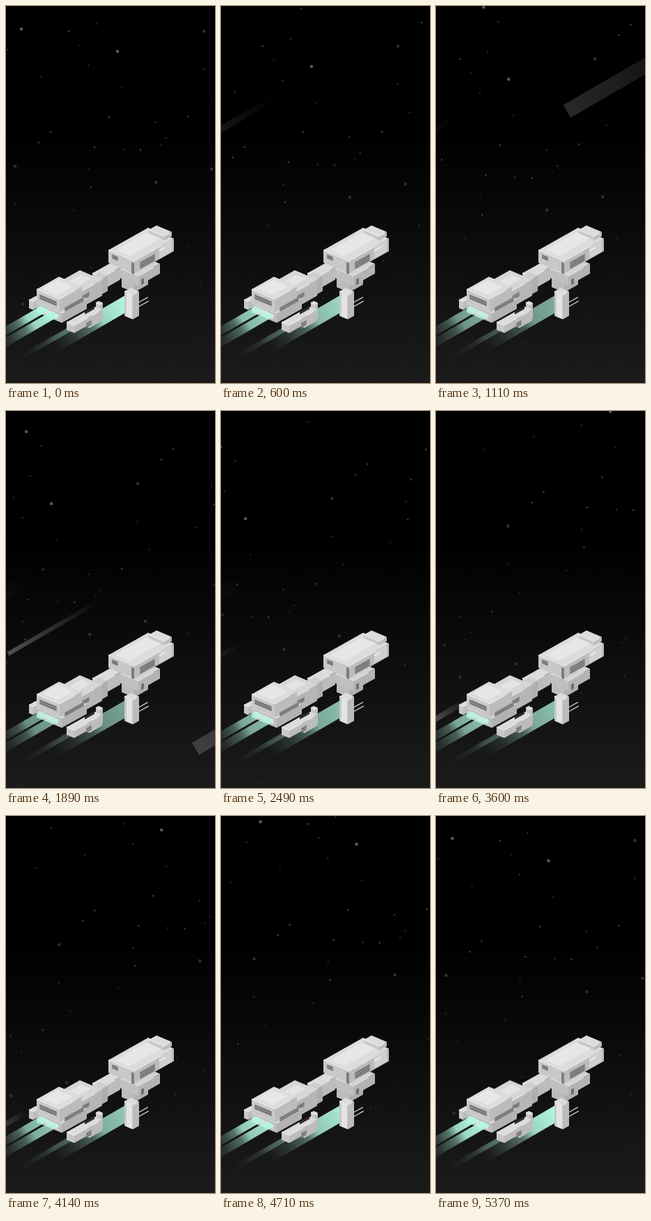
Animation, 300 px wide and 539 px high, one loop 5460 ms. Source, as an HTML page with a canvas:

```html
<!DOCTYPE html>
<html lang="en">
<head>
<meta charset="utf-8">
<title>Spaceship</title>
<style>
html, body { margin: 0; width: 100%; height: 100%; overflow: hidden; background: #000; }
canvas { display: block; width: 300px; height: 539px; }
</style>
</head>
<body>
<canvas id="c" width="300" height="539"></canvas>
<script>
const W = 300, H = 539, LOOP = 5460, STEP = 30, STEPS = 180;
const DRIFT = { x: -271, y: 193 };
const SLOPE = Math.tan(Math.PI / 6);
const ctx = document.getElementById('c').getContext('2d');

const clamp = v => Math.max(0, Math.min(1, v));
const grey = v => `rgb(${v},${v},${v})`;

function poly(g, fill, points) {
  g.beginPath();
  points.forEach(p => g.lineTo(p[0], p[1]));
  g.closePath();
  g.fillStyle = fill;
  g.fill();
}

function fade(x0, y0, x1, y1, stops) {
  const g = ctx.createLinearGradient(x0, y0, x1, y1);
  stops.forEach(([o, c]) => g.addColorStop(o, c));
  return g;
}

// ---- ship: boxes in a slanted view, FORE runs up right, SIDE runs down right
const FORE = [1, -.56], SIDE = [1, .42], DOWN = [0, 1];
const move = (p, axis, d) => [p[0] + axis[0] * d, p[1] + axis[1] * d];

function face(g, tone, p, u, du, v, dv) {
  const q = move(p, u, du);
  poly(g, grey(tone), [p, q, move(q, v, dv), move(p, v, dv)]);
}

function edge(g, p, axis, d, tone = 238) {
  const q = move(p, axis, d);
  g.beginPath();
  g.moveTo(p[0], p[1]);
  g.lineTo(q[0], q[1]);
  g.strokeStyle = grey(tone);
  g.lineWidth = 1.4;
  g.stroke();
}

// x, y: left corner of the top face
function box(g, x, y, fore, side, h, dim = 0) {
  const p = [x, y], q = move(p, SIDE, side);
  face(g, 220 - dim, p, FORE, fore, SIDE, side);
  face(g, 200 - dim, p, SIDE, side, DOWN, h);
  face(g, 188 - dim, q, FORE, fore, DOWN, h);
  edge(g, p, SIDE, side, 230 - dim);
  edge(g, q, FORE, fore * .7, 230 - dim);
}

function vent(g, x, y, axis, len, h, rows) {
  face(g, 145, [x, y], axis, len, DOWN, h);
  for (let i = 0; i < rows; i++) edge(g, [x + 1, y + (i + .6) * h / rows], axis, len - 2, 108);
}

function paintShip(g) {
  // neck and middle
  box(g, 124, 382, 26, 14, 18);
  box(g, 110, 394, 24, 12, 22, 14);
  box(g, 70, 398, 36, 32, 23, 6);
  face(g, 228, [90, 394], FORE, 18, SIDE, 14);
  vent(g, 106, 416, FORE, 14, 6, 2);

  // rear hull and exhaust
  box(g, 33, 420, 10, 6, 12);
  box(g, 44, 424, 36, 36, 14, 10);
  box(g, 44, 405, 32, 33, 19);
  face(g, 231, [52, 404], FORE, 22, SIDE, 22);
  vent(g, 48, 412, SIDE, 25, 7, 2);
  vent(g, 84, 431, FORE, 28, 6, 2);
  face(g, 222, [47, 429], SIDE, 28, DOWN, 7);

  // pod
  box(g, 129, 424, 4, 6, 22);
  box(g, 110, 440, 18, 10, 16);
  box(g, 87, 452, 26, 11, 11);
  face(g, 45, [113, 437], FORE, 14, DOWN, 4);
  vent(g, 115, 453, FORE, 8, 7, 2);

  // fin and front hull
  for (const y of [424, 430]) edge(g, [190, y], FORE, y / 6 - 57, 205);
  box(g, 166, 384, 20, 18, 18, 12);
  box(g, 170, 408, 9, 12, 35);
  face(g, 228, [173, 410], SIDE, 8, DOWN, 34);
  box(g, 164, 375, 31, 26, 14, 8);
  face(g, 110, [194, 391], FORE, 4, DOWN, 8);
  box(g, 147, 349, 57, 37, 18);
  box(g, 205, 320, 11, 22, 6);
  face(g, 231, [157, 349], FORE, 45, SIDE, 20);
  face(g, 208, [220, 344], FORE, 18, DOWN, 17);
  vent(g, 152, 355, SIDE, 9, 6, 2);
  face(g, 125, [180, 366], SIDE, 4, DOWN, 16);
  vent(g, 192, 366, FORE, 22, 10, 3);
  edge(g, [220, 350], FORE, 9, 246);
}

const ship = document.createElement('canvas');
ship.width = W;
ship.height = H;
paintShip(ship.getContext('2d'));

// ---- stars: one period of a field that repeats along DRIFT
let seed = 7;
function rnd() {
  seed = (seed * 16807) % 2147483647;
  return seed / 2147483647;
}
const star = (r, tone) => ([x, y]) => ({ x, y, r, tone });
const stars = [
  ...[[160, 65], [22, 33], [124, -38]].map(star(2.3, 88)),
  ...[[284, 36], [215, 252], [295, 233]].map(star(2.3, 46)),
  ...[[47, 195], [64, 180], [148, 159], [127, 202], [193, 206], [122, 259], [90, 36], [261, 158]].map(star(1.5, 52))
];
for (let i = 0; i < 50; i++) {
  stars.push({ x: 29 + 271 * rnd(), y: -330 + 1060 * rnd(), r: 1.3, tone: 30 + 14 * rnd() });
}

function drawStars(n) {
  for (const s of stars) {
    ctx.fillStyle = grey(s.tone);
    for (let f = n / STEPS - 1; f < 2; f++) {
      ctx.beginPath();
      ctx.arc(s.x + DRIFT.x * f, s.y + DRIFT.y * f, s.r, 0, 7);
      ctx.fill();
    }
  }
}

// ---- streaks: start time, height at x = 0, width, length, alpha
const streaks = [
  [80, 176, 9, 140, .16],
  [952, 259, 21, 240, .16],
  [1490, 349, 6, 130, .28],
  [1781, 640, 20, 240, .18],
  [2970, 440, 8, 82, .4]
];

function drawStreak([t0, y0, w, len, alpha], t) {
  const age = t - t0;
  if (age < 0 || age > 1700) return;
  const ease = 1 - (1 - clamp(age / 900)) ** 3;
  const x = 500 + (30 - len - 500) * ease;
  const a = alpha * clamp((1700 - age) / 150);
  const l = len * 1.15;
  ctx.save();
  ctx.translate(x, y0 - x * SLOPE);
  ctx.rotate(-Math.PI / 6);
  ctx.fillStyle = fade(0, 0, l, 0, [[0, `rgba(255,255,255,${a})`], [1, 'rgba(255,255,255,0)']]);
  ctx.fillRect(0, -w / 2, l, w);
  ctx.restore();
}

// ---- engine beams, trailing down left from the edge (x, y) to (x + dx, y + dy)
const mint = a => `rgba(178,247,224,${a})`;
function beam(x, y, dx, dy, len, a) {
  const drop = len * SLOPE;
  const mx = x + dx / 2, my = y + dy / 2;
  // the fade runs across the edge's own direction so that both ends stay parallel
  const fill = fade(mx, my, mx - len, my + drop,
    [[0, mint(a)], [.35, mint(a * .85)], [.5, mint(a * .42)], [.75, mint(a * .15)], [1, mint(0)]]);
  poly(ctx, fill, [[x, y], [x + dx, y + dy], [x + dx - len, y + dy + drop], [x - len, y + drop]]);
}

function glow(n) {
  const a = n / STEPS * 2 * Math.PI;
  return clamp(.8 + .12 * Math.cos(a) + .1 * Math.cos(2 * a) - .08 * Math.sin(a));
}

function draw(now) {
  const n = Math.min(Math.floor(now % LOOP / STEP), STEPS - 1);
  ctx.fillStyle = fade(0, 0, 0, H, [[.34, '#000'], [1, '#1b1b1b']]);
  ctx.fillRect(0, 0, W, H);
  streaks.forEach(s => drawStreak(s, n * STEP));
  drawStars(n);
  const g = glow(n);
  beam(174, 412, 0, 25, 105, g);
  beam(95, 456, 0, 8, 75, g * .35);
  ctx.drawImage(ship, 0, 0);
  beam(50, 429, 12, 6, 75, g);
  beam(66, 436, 11, 7, 85, g);
}

let start;
function tick(now) {
  start ??= now;
  draw(now - start);
  requestAnimationFrame(tick);
}
draw(0);
requestAnimationFrame(tick);
</script>
</body>
</html>
```
